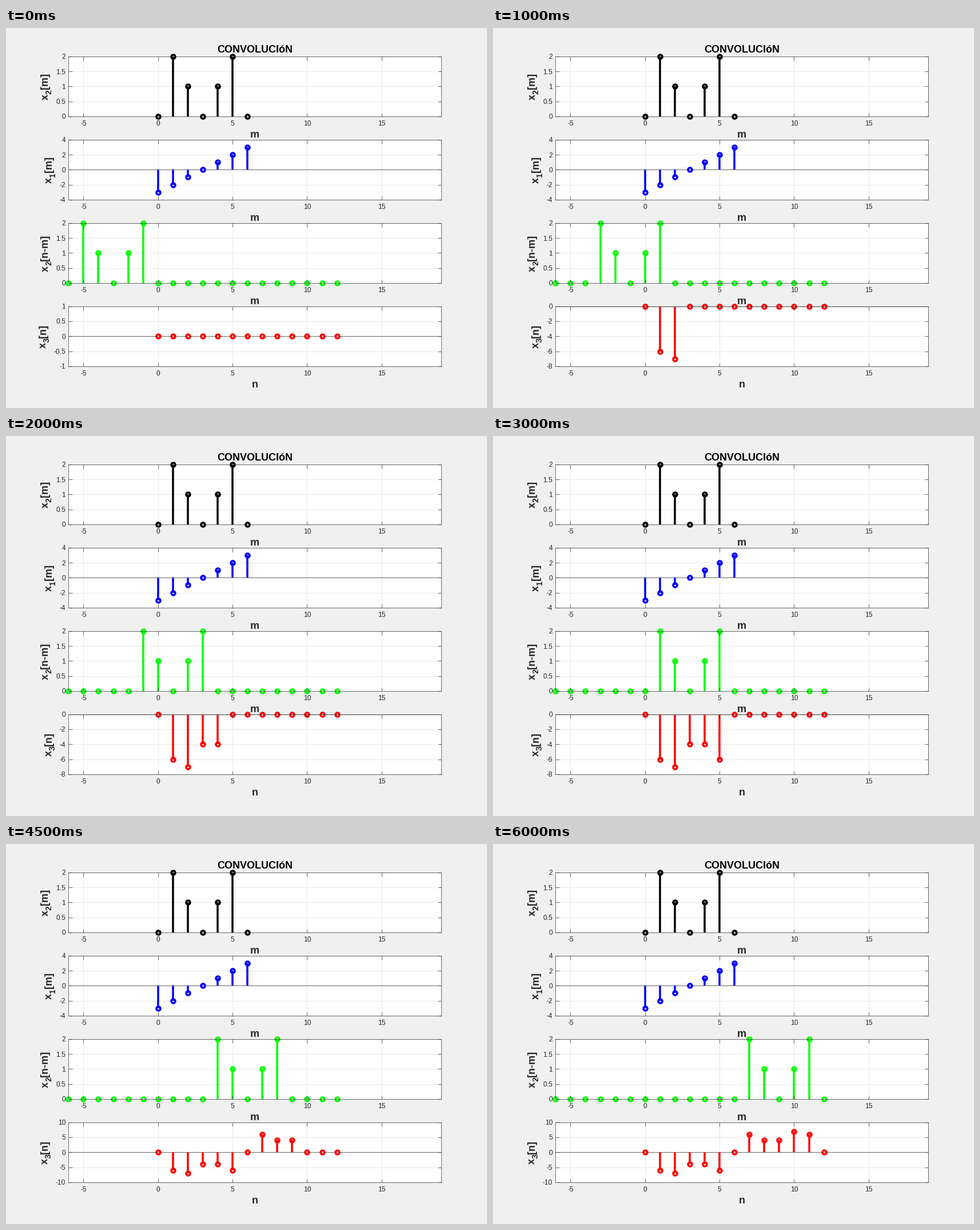
Write a matplotlib script that moves like this. It is 841 px wide and 666 px high and loops after 6500 ms.

```python
import numpy as np
import matplotlib.pyplot as plt
from matplotlib.animation import FuncAnimation

W, H, DPI = 841, 666, 64
LEFT, WIDTH, HEIGHT = 0.13 * W, 0.775 * W, 105.0
TOPS = [49.9 + 145.95 * k for k in range(4)]
INK = "#262626"


def px(size):
    return size * 72 / DPI


plt.rcParams["font.family"] = "Liberation Sans"
fig = plt.figure(figsize=(W / DPI, H / DPI), dpi=DPI, facecolor="#f0f0f0")
axes = [fig.add_axes([LEFT / W, 1 - (top + HEIGHT) / H, WIDTH / W, HEIGHT / H])
        for top in TOPS]
renderer = fig.canvas.get_renderer()

x1 = np.arange(-3, 4)
x2 = np.array([0, 2, 1, 0, 1, 2, 0])
x3 = np.convolve(x1, x2)
short = np.arange(7)
result = np.arange(13)
wide = np.arange(-6, 13)


def text_width(text, size, weight="normal"):
    probe = fig.text(0, 0, text, size=px(size), weight=weight)
    width = probe.get_window_extent(renderer).width
    probe.remove()
    return width


def put(ax, x, y, text, size=18, color=INK, **kw):
    """Bold text with its baseline at stage pixel (x, y)."""
    ax.text(x / W, 1 - y / H, text, transform=fig.transFigure, size=px(size),
            weight="bold", color=color, va="baseline", **kw)


def side_label(ax, x, middle, index, rest):
    """Rotated x_index[rest], centred on the panel."""
    parts = [("x", 18, 0), (index, 14, 6), (f"[{rest}]", 18, 0)]
    widths = [text_width(s, size, "bold") + 0.5 for s, size, _ in parts]
    y = middle + sum(widths) / 2
    for (s, size, drop), width in zip(parts, widths):
        put(ax, x + drop, y, s, size, ha="left", rotation=90,
            rotation_mode="anchor")
        y -= width


def panel(k, m, values, color, low, high, step, index, arg, var="m"):
    ax, top = axes[k], TOPS[k]
    ax.clear()
    ax.set(xlim=(-6, 19), ylim=(low, high))
    ax.set_axisbelow(False)
    xticks = np.arange(-5, 16, 5)
    yticks = np.arange(low, high + step / 2, step)
    names = [f"{v:g}" for v in yticks]
    ax.set_xticks(xticks, [str(v) for v in xticks])
    ax.set_yticks(yticks, names)
    ax.tick_params(direction="in", top=True, right=True, length=px(6.5),
                   width=px(0.67), color=INK, labelcolor=INK,
                   labelsize=px(12))
    ax.tick_params(axis="x", pad=px(7))
    ax.tick_params(axis="y", pad=px(5))
    for spine in ax.spines.values():
        spine.set(color=INK, linewidth=px(0.67))

    grid = dict(color="#dfdfdf", lw=px(0.67), zorder=0.5)
    for v in xticks:
        ax.axvline(v, **grid)
    for v in yticks:
        ax.axhline(v, **grid)
    ax.axhline(0, color=INK, lw=px(0.67), zorder=1)

    for x, v in zip(m, values):
        if v:
            ax.plot([x, x], [0, v], color=color, lw=px(3.5), clip_on=False,
                    solid_capstyle="butt", zorder=2)
    ax.plot(m, values, "o", ms=px(7), mfc="none", mec=color, mew=px(3.5),
            clip_on=False, zorder=2.1)

    label_x = LEFT - 19 - max(text_width(s, 12) for s in names)
    side_label(ax, label_x, top + HEIGHT / 2, index, arg)
    put(ax, LEFT + WIDTH / 2, top + HEIGHT + 37, var, ha="center")


def result_scale(n):
    if n == 0:
        return -1, 1, 0.5
    if n == 1:
        return -6, 0, 2
    return (-8, 0, 2) if n < 7 else (-10, 10, 5)


def draw(n):
    lag = n - wide
    inside = (lag >= 0) & (lag < len(x2))
    shifted = np.where(inside, x2[np.clip(lag, 0, len(x2) - 1)], 0)
    panel(2, wide, shifted, "#00ff00", 0, 2, 0.5, "2", "n-m")
    panel(3, result, np.where(result <= n, x3, 0), "#ff0000",
          *result_scale(n), "3", "n", "n")


panel(0, short, x2, "#000000", 0, 2, 0.5, "2", "m")
panel(1, short, x1, "#0000ff", -4, 4, 2, "1", "m")
put(axes[0], LEFT + WIDTH / 2, TOPS[0] - 7, "CONVOLUCIóN", color="black",
    ha="center")

anim = FuncAnimation(fig, draw, frames=13, interval=500, repeat=True,
                     repeat_delay=0, init_func=lambda: draw(0))
plt.show()
```
